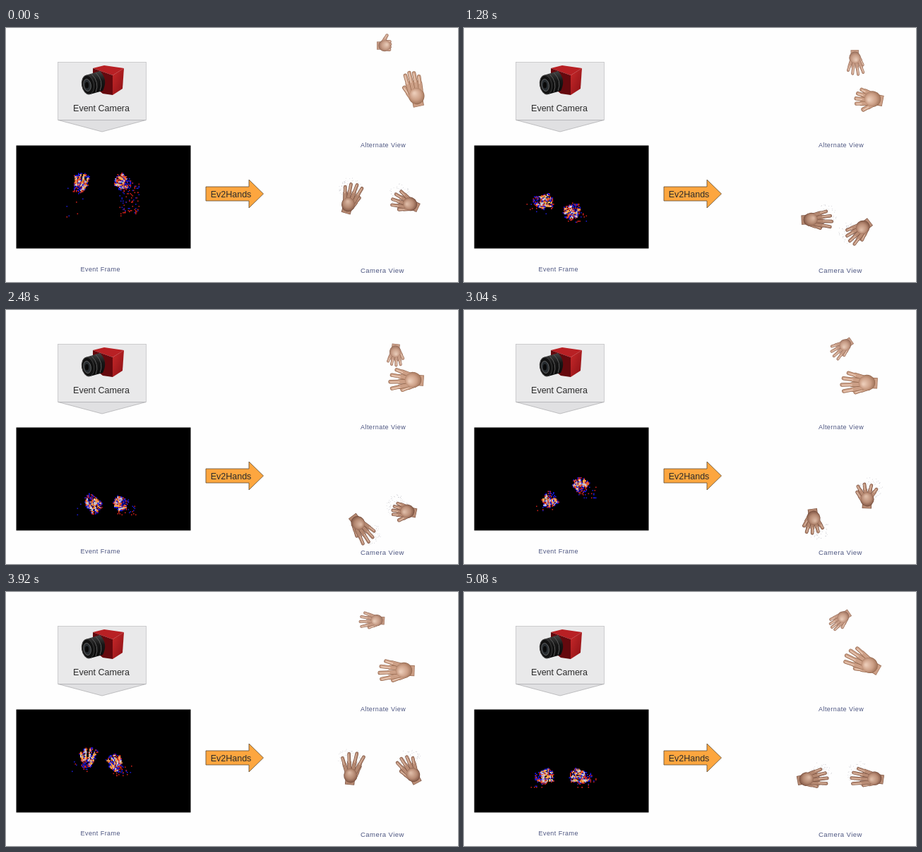
These frames come from a looping animation (640 px wide and 360 px high, 5120 ms). An HTML page with a canvas:

```html
<!DOCTYPE html>
<html lang="en">
<head>
<meta charset="utf-8">
<title>Event camera hands</title>
<style>
  html, body { margin: 0; width: 100%; height: 100%; overflow: hidden; background: #fefefe; }
  svg, canvas { position: absolute; left: 0; top: 0; width: 640px; height: 360px; }
  text { font-family: "Liberation Sans", Arial, sans-serif; }
  .title { font-size: 12.5px; fill: #2b2b2b; text-anchor: middle; }
  .label { font-size: 9px; letter-spacing: .45px; fill: #4c5580; }
</style>
</head>
<body>
<svg viewBox="0 0 640 360">
  <defs>
    <linearGradient id="red" x1="0" y1="0" x2="1" y2="1">
      <stop offset="0" stop-color="#c92a2b"/><stop offset="1" stop-color="#8a0f14"/>
    </linearGradient>
    <linearGradient id="barrel" x1="0" y1="0" x2="0" y2="1">
      <stop offset="0" stop-color="#454545"/><stop offset=".4" stop-color="#171717"/><stop offset="1" stop-color="#080808"/>
    </linearGradient>
  </defs>
  <rect x="73.5" y="48.5" width="125" height="82" fill="#e9e9ea" stroke="#c4c4c6" stroke-width=".8"/>
  <path d="M74 130.5H198L136 147Z" fill="#e0e0e2" stroke="#b2b2b4" stroke-width=".8"/>

  <path d="M123 57L139 53L167 57L151 67Z" fill="#b82024"/>
  <path d="M123 57L151 67V95L137 93L123 82Z" fill="#65090e"/>
  <path d="M151 67L167 57L165 86L151 95Z" fill="url(#red)"/>
  <path d="M113 67L133 61Q145 73 137 89L119 94Z" fill="url(#barrel)"/>
  <path d="M121 65q12 12 6 26M127 63q12 12 6 26" fill="none" stroke="#5b5b5b" stroke-width="1"/>
  <ellipse cx="116" cy="80.5" rx="8.5" ry="13.5" transform="rotate(-10 116 80.5)" fill="#111" stroke="#3b3b3b"/>
  <ellipse cx="115" cy="81" rx="5.2" ry="8.6" transform="rotate(-10 115 81)" fill="#272c30" stroke="#777" stroke-width=".7"/>
  <ellipse cx="114.5" cy="81" rx="2.6" ry="4.6" fill="#090909"/>
  <text class="title" x="135" y="117.5">Event Camera</text>

  <rect x="14.5" y="166.5" width="247" height="146" fill="#000"/>
  <path d="M283 225H344V215L364.500 235L344 255V245H283Z" fill="#fda63f" stroke="#5d4a30" stroke-width=".8"/>
  <text class="title" x="318.500" y="240">Ev2Hands</text>

  <text class="label" x="105.500" y="345">Event Frame</text>
  <text class="label" x="502" y="169">Alternate View</text>
  <text class="label" x="502" y="347" style="font-size:9.5px">Camera View</text>
</svg>
<canvas width="640" height="360"></canvas>
<script>
const ctx = document.querySelector('canvas').getContext('2d');
const LOOP = 5120, STEP = 40;
const TIMES = [0, 800, 1800, 2480, 3040, 3920, 5080];

// Each pose: palm x, palm y, pointing angle, reach, degrees between fingers.
const HANDS = [
  { side: -1, scale: .8, tone: ['#8f6653', '#c79c86', '#e6c8b5'], poses: [
    [537, 25, -270, 9, 4], [553, 36, -183, 25, 13], [554, 51, -180, 24, 13], [551, 60, -174, 20, 12],
    [539, 50, -125, 23, 12], [524, 40, -86, 24, 11], [536, 36, -125, 22, 6]] },
  { side: -1, scale: 1.1, tone: ['#96694f', '#cc9f86', '#ebcbb7'], poses: [
    [581, 95, -12, 35, 3], [577, 97, -70, 20, 9], [577, 104, -89, 28, 8], [575, 99, -86, 33, 11],
    [569, 103, -87, 36, 9], [562, 111, -88, 35, 9], [573, 103, -60, 36, 8]] },
  { side: 1, scale: .95, tone: ['#744b3a', '#b38770', '#d9b5a0'], dots: true, poses: [
    [485, 249, 16, 31, 10], [491, 264, 75, 31, 7], [493, 280, 101, 30, 11], [499, 303, 142, 31, 10],
    [495, 296, 173, 22, 16], [488, 259, 6, 33, 15], [486, 265, 80, 30, 8]] },
  { side: -1, scale: .95, tone: ['#744b3a', '#b98c75', '#ddbaa5'], dots: true, poses: [
    [571, 249, -65, 26, 12], [566, 271, -112, 28, 10], [561, 297, -145, 26, 11], [567, 285, -78, 21, 6],
    [571, 267, 3, 22, 22], [576, 258, -28, 29, 10], [580, 264, -82, 33, 8]] }
];
const EVENTS = [
  { hand: HANDS[2], at: [[104, 220], [109, 236], [112, 254], [122, 272], [122, 268], [114, 236], [112, 260]] },
  { hand: HANDS[3], at: [[166, 217], [150, 240], [155, 277], [162, 272], [166, 248], [156, 243], [166, 260]] }
];

function random(seed) {
  return () => {
    seed = (seed + 0x6D2B79F5) | 0;
    let v = Math.imul(seed ^ (seed >>> 15), 1 | seed);
    v ^= v + Math.imul(v ^ (v >>> 7), 61 | v);
    return ((v ^ (v >>> 14)) >>> 0) / 4294967296;
  };
}

function sample(rows, t) {
  let i = 0;
  while (i < TIMES.length - 2 && t >= TIMES[i + 1]) i++;
  const u = Math.min(1, (t - TIMES[i]) / (TIMES[i + 1] - TIMES[i]));
  const k = u * u * (3 - 2 * u);
  return rows[i].map((v, j) => v + (rows[i + 1][j] - v) * k);
}

// Thumb and fingers as [x0, y0, x1, y1, width], pointing up from the palm.
function digits(reach, fan, side) {
  const list = [[side * 6, 4, side * (21 - reach * .25), 2 - reach * .45, 5.6]];
  [.93, 1, .95, .78].forEach((part, i) => {
    const off = side * (1.5 - i), a = off * fan * Math.PI / 180;
    const x = off * 4.6, y = -5, len = Math.max(3, reach * part - 7);
    list.push([x, y, x + Math.sin(a) * len, y - Math.cos(a) * len, 5]);
  });
  return list;
}

function line(x0, y0, x1, y1, width, color) {
  ctx.lineWidth = width;
  ctx.strokeStyle = color;
  ctx.beginPath();
  ctx.moveTo(x0, y0);
  ctx.lineTo(x1, y1);
  ctx.stroke();
}

function ellipse(rx, ry, fill) {
  ctx.fillStyle = fill;
  ctx.beginPath();
  ctx.ellipse(0, 1, rx, ry, 0, 0, 7);
  ctx.fill();
}

function drawHand({ side, scale, tone, poses, dots }, t, rnd) {
  const [x, y, angle, reach, fan] = sample(poses, t);
  const [dark, base, light] = tone;
  ctx.save();
  ctx.translate(x, y);
  ctx.rotate(angle * Math.PI / 180);
  if (dots) {
    ctx.fillStyle = '#b9b9c0';
    for (let i = 0; i < 75; i++) {
      const a = rnd() * 6.283, r = Math.sqrt(rnd());
      ctx.fillRect(Math.cos(a) * r * 17 - side * 4, -reach * .7 + Math.sin(a) * r * 15, .7, .7);
    }
  }
  ctx.scale(scale, scale);
  ctx.lineCap = 'butt';
  line(0, 4, 0, 15, 14, dark);
  line(0, 4, 0, 14.5, 12.5, base);
  ellipse(10.2, 11, dark);
  ctx.lineCap = 'round';
  for (const [x0, y0, x1, y1, w] of digits(reach / scale, fan, side)) {
    const mx = (x0 + x1) / 2, my = (y0 + y1) / 2;
    line(x0, y0, mx, my, w + 1, dark);
    line(mx, my, x1, y1, w - .1, dark);
    line(x0, y0, mx, my, w - .3, base);
    line(mx, my, x1, y1, w - 1.3, base);
    line(mx - .6, my, x1 - .5, y1 + .5, 1.3, light);
  }
  const glow = ctx.createRadialGradient(-2, -3, 1, 0, 1, 12);
  glow.addColorStop(0, light);
  glow.addColorStop(.55, base);
  glow.addColorStop(1, dark);
  ellipse(9.6, 10.4, glow);
  ctx.restore();
}

function drawEvents({ hand, at }, t, rnd) {
  const [cx, cy] = sample(at, t);
  const [, , angle, reach, fan] = sample(hand.poses, t);
  const a = angle * Math.PI / 180, cos = Math.cos(a), sin = Math.sin(a);
  const pixel = (x, y, color) => {
    ctx.fillStyle = color;
    ctx.fillRect(Math.round(x / 1.5) * 1.5, Math.round(y / 1.5) * 1.5, 1.6, 1.6);
  };
  const place = (x, y, color) => {
    y += reach * .3;
    pixel(cx + (x * cos - y * sin) * .72, cy + (x * sin + y * cos) * .72, color);
  };
  const edge = () => rnd() < .6 ? '#1414e0' : '#d8281a';
  const core = (x, y) => {
    const v = Math.sin(x * .55 + t * .01) + Math.cos(y * .45 + x * .2) + rnd() - .5;
    return v > .1 ? '#ffa64d' : v > -1.1 ? '#c6cdec' : '#ee5a2a';
  };
  for (let i = 0; i < 50; i++) {
    const r = Math.sqrt(rnd()) * 10, b = rnd() * 6.283;
    place(Math.cos(b) * r, Math.sin(b) * r, edge());
  }
  for (const [x0, y0, x1, y1] of digits(reach, fan, hand.side)) {
    const len = Math.hypot(x1 - x0, y1 - y0) || 1;
    for (let i = 0; i < 60; i++) {
      const k = rnd() * 1.1, u = rnd() * 2 - 1;
      const x = x0 + (x1 - x0) * k - (y1 - y0) / len * u * 3;
      const y = y0 + (y1 - y0) * k + (x1 - x0) / len * u * 3;
      place(x, y, Math.abs(u) > .72 || k > 1 ? edge() : core(x, y));
    }
  }
  // Loose events trail from the right wrist, strongest at the start.
  const trail = hand.side < 0 ? 24 + 70 * Math.max(0, 1 - t / 900) : 10;
  for (let i = 0; i < trail; i++) {
    const d = rnd();
    pixel(cx - hand.side * (8 + (rnd() - .5) * 28), cy + 8 + d * (t < 900 ? 46 : 16) - 6,
      rnd() < .55 ? '#c41f18' : '#1a1ac8');
  }
}

function render(now) {
  const frame = Math.floor((now % LOOP) / STEP), t = frame * STEP;
  const rnd = random(frame * 97 + 11);
  ctx.clearRect(0, 0, 640, 360);
  HANDS.forEach(hand => drawHand(hand, t, rnd));
  ctx.save();
  ctx.beginPath();
  ctx.rect(15, 167, 246, 145);
  ctx.clip();
  EVENTS.forEach(cloud => drawEvents(cloud, t, rnd));
  ctx.restore();
}

const start = performance.now();
function tick() {
  render(performance.now() - start);
  requestAnimationFrame(tick);
}
tick();
</script>
</body>
</html>
```
